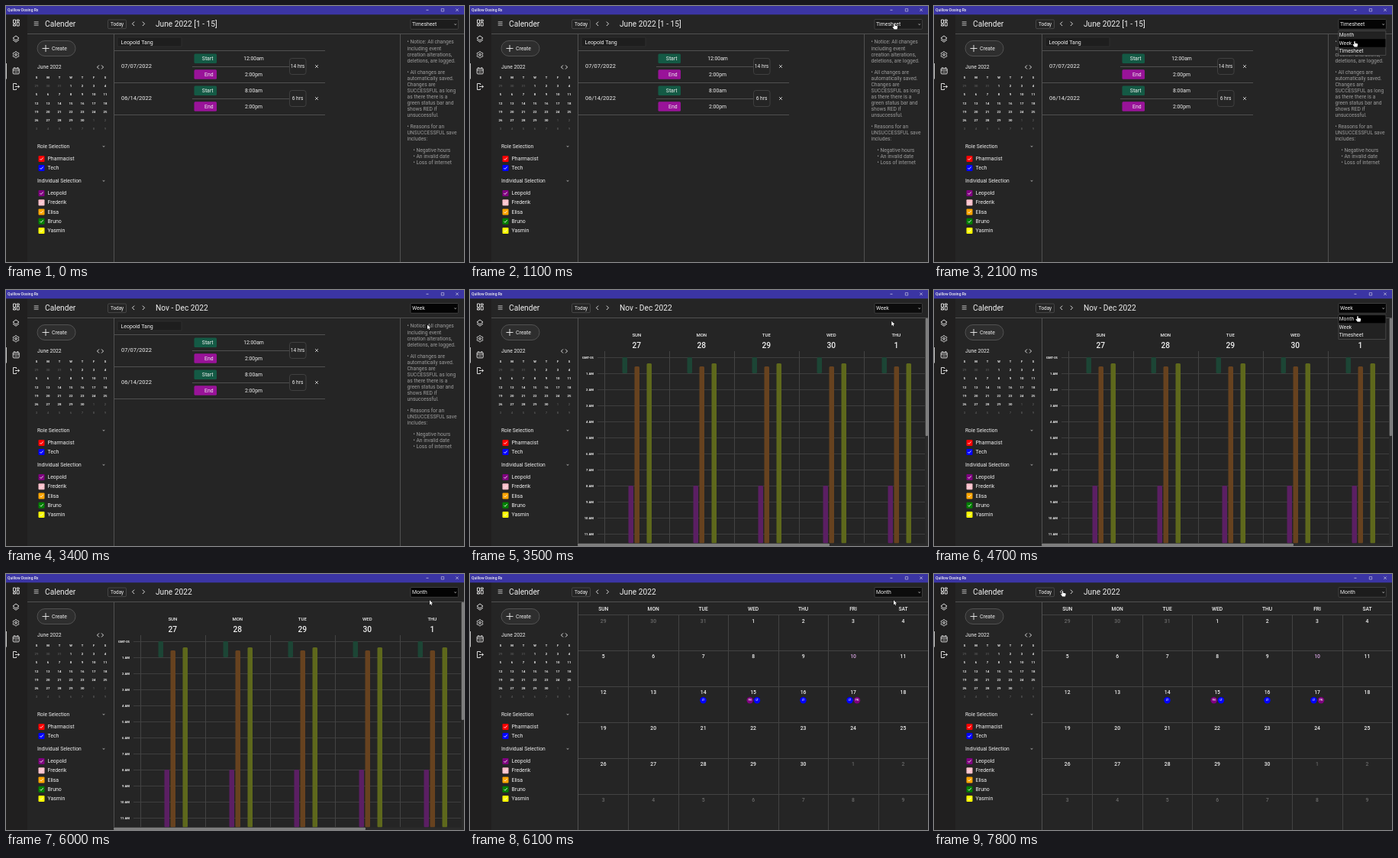
Write an HTML page with a canvas that moves like this. It is 600 by 335 pixels and loops after 8000 ms.

```html
<!DOCTYPE html>
<html lang="en">
<head>
<meta charset="utf-8">
<title>Calender</title>
<style>
  html, body { margin: 0; width: 100%; height: 100%; overflow: hidden; background: #252525; }
  canvas { display: block; width: 600px; height: 335px; }
</style>
</head>
<body>
<canvas id="stage"></canvas>
<script>
const canvas = document.getElementById('stage');
const ctx = canvas.getContext('2d');
const ratio = window.devicePixelRatio || 1;
canvas.width = 600 * ratio;
canvas.height = 335 * ratio;

const LOOP = 8000;
const WHITE = '#f0f0f0', RULE = '#505050', GRID = '#434343', DIM = '#5c5c5c', BACK = '#252525';
const DAYS = ['SUN', 'MON', 'TUE', 'WED', 'THU', 'FRI', 'SAT'];
const VIEWS = ['Month', 'Week', 'Timesheet'];

// Cursor keyframes: time, x, y of the pointing tip
const PATH = [
  [400, 562, 90], [1100, 556, 23], [1700, 556, 23], [2100, 551, 46],
  [3300, 551, 46], [3400, 552, 45.5], [3700, 553, 27.5], [4000, 554, 24],
  [4200, 554, 24], [4700, 555, 34], [6800, 555, 34.5], [7700, 168.5, 22]
];

function text(s, x, y, size = 6.8, color = WHITE, weight = 400, align = 'left') {
  ctx.font = `${weight} ${size}px Roboto, sans-serif`;
  ctx.fillStyle = color;
  ctx.textAlign = align;
  ctx.fillText(s, x, y);
}

function line(points, color = RULE, width = 1) {
  ctx.beginPath();
  for (let i = 0; i < points.length; i += 2) ctx.lineTo(points[i], points[i + 1]);
  ctx.strokeStyle = color;
  ctx.lineWidth = width;
  ctx.stroke();
}

function box(x, y, w, h, fill, stroke, radius = 0, width = 0.8) {
  ctx.beginPath();
  ctx.roundRect(x, y, w, h, radius);
  if (fill) { ctx.fillStyle = fill; ctx.fill(); }
  if (stroke) { ctx.strokeStyle = stroke; ctx.lineWidth = width; ctx.stroke(); }
}

function disc(x, y, r, fill, stroke) {
  ctx.beginPath();
  ctx.arc(x, y, r, 0, 2 * Math.PI);
  if (fill) { ctx.fillStyle = fill; ctx.fill(); }
  if (stroke) { ctx.strokeStyle = stroke; ctx.lineWidth = 0.9; ctx.stroke(); }
}

const chevron = (x, y, dir, size, width = 0.9) =>
  line([x - dir * size / 2, y - size, x + dir * size / 2, y, x - dir * size / 2, y + size], WHITE, width);

const caret = (x, y) => line([x - 1.3, y - 0.4, x, y + 0.5, x + 1.3, y - 0.4], WHITE, 0.7);

// Day shown in a six-week grid for June 2022, which starts on May 29
function gridDay(i) {
  if (i < 3) return [29 + i, false];
  return i < 33 ? [i - 2, true] : [i - 32, false];
}

function windowBar() {
  box(0, 0, 600, 11.3, '#3b35a4');
  text('Quillow Dosing Rx', 2, 5.2, 5, WHITE, 500);
  line([550.5, 5.3, 553.5, 5.3], WHITE, 0.6);
  box(570.3, 3.6, 3.4, 3.4, null, WHITE, 0, 0.5);
  line([589.3, 3.5, 592.7, 6.9], WHITE, 0.6);
  line([592.7, 3.5, 589.3, 6.9], WHITE, 0.6);
}

function gear(x, y) {
  ctx.beginPath();
  for (let i = 0; i <= 48; i++) {
    const a = i * Math.PI / 24, r = 3.7 + 0.6 * Math.cos(6 * a);
    ctx.lineTo(x + r * Math.sin(a), y + r * Math.cos(a));
  }
  ctx.strokeStyle = WHITE;
  ctx.lineWidth = 0.9;
  ctx.stroke();
  disc(x, y, 1.3, null, WHITE);
}

function rail() {
  box(0, 11, 28, 324, '#201f1f');
  box(0, 75, 0.9, 20.5, '#ddd');
  // dashboard
  box(9.5, 18, 3, 4.5, null, WHITE, 0, 0.9);
  box(9.5, 24, 3, 2, null, WHITE, 0, 0.9);
  box(14.2, 18, 3, 2, null, WHITE, 0, 0.9);
  box(14.2, 21.6, 3, 4.4, null, WHITE, 0, 0.9);
  // layers
  line([13, 39, 17, 42, 13, 45, 9, 42, 13, 39], WHITE, 0.9);
  line([9, 44.2, 13, 47.2, 17, 44.2], WHITE, 0.9);
  gear(13, 63.8);
  // calendar
  box(9.2, 81.5, 8, 7.3, null, WHITE, 1, 0.9);
  line([9.2, 83.8, 17.2, 83.8], WHITE, 0.9);
  line([11, 80.2, 11, 82], WHITE);
  line([15.4, 80.2, 15.4, 82], WHITE);
  line([11, 86.3, 15.5, 86.3], WHITE, 0.7);
  // log out
  line([13.5, 103, 13.5, 101.5, 9.5, 101.5, 9.5, 109.5, 13.5, 109.5, 13.5, 108], WHITE, 0.9);
  line([11.8, 105.5, 17.2, 105.5], WHITE, 0.9);
  chevron(16.6, 105.5, 1, 1.9);
}

function header(title) {
  for (let i = 0; i < 3; i++) line([36.7, 20.8 + i * 2.2, 42.6, 20.8 + i * 2.2], WHITE, 0.7);
  text('Calender', 51, 24, 10.2);
  box(133.5, 18, 24, 11.6, null, '#505050', 1.5);
  text('Today', 145.5, 24, 6.4, WHITE, 400, 'center');
  chevron(166.8, 23.3, -1, 2.7);
  chevron(180.2, 23.3, 1, 2.7);
  text(title, 196, 24, 10.2);
  line([28, 36.5, 600, 36.5]);
}

function check(label, color, y) {
  box(42.5, y - 4, 8, 8, color, null, 1);
  line([44.4, y, 45.9, y + 1.5, 48.7, y - 1.6], WHITE, 0.9);
  text(label, 54.5, y, 6.9);
}

function sidebar() {
  line([141.5, 36, 141.5, 335]);
  box(41, 45.5, 50, 20, '#2e2e2e', '#5c5c5c', 10);
  line([47.5, 55.5, 56.5, 55.5], WHITE, 0.9);
  line([52, 51, 52, 60], WHITE, 0.9);
  text('Create', 60, 55.7, 6.85);

  text('June 2022', 41, 80.5, 6.75);
  chevron(120.7, 80, -1, 2.5);
  chevron(126.3, 80, 1, 2.5);
  DAYS.forEach((d, i) => text(d[0], 40 + i * 15, 93.6, 4.1, WHITE, 700, 'center'));
  for (let i = 0; i < 42; i++) {
    const [day, inMonth] = gridDay(i);
    text(day, 40 + (i % 7) * 15, 105 + Math.floor(i / 7) * 11.15, 4.3, inMonth ? WHITE : DIM, inMonth ? 700 : 500, 'center');
  }

  text('Role Selection', 41, 183.8, 6.7);
  caret(128, 183.7);
  check('Pharmacist', '#f00', 200);
  check('Tech', '#00f', 212);
  text('Individual Selection', 41, 228.8, 6.7);
  caret(128, 228.8);
  const people = [['Leopold', 'purple'], ['Frederik', 'pink'], ['Elisa', 'orange'], ['Bruno', 'green'], ['Yasmin', 'yellow']];
  people.forEach(([name, color], i) => check(name, color, 245 + i * 12.25));
}

function shift(y, date, start, end, hours) {
  text(date, 151, y, 7.5);
  box(246.5, y - 16.5, 29.5, 12.5, '#145a45', null, 1.5);
  text('Start', 271.5, y - 10, 6.8, WHITE, 400, 'right');
  box(246.5, y + 4.3, 29.5, 12.5, '#991399', null, 1.5);
  text('End', 271.5, y + 10.8, 6.8, WHITE, 400, 'right');
  text(start, 324.5, y - 10, 6.8, WHITE, 400, 'center');
  text(end, 324.5, y + 10.8, 6.8, WHITE, 400, 'center');
  line([244, y + 0.5, 371, y + 0.5]);
  box(371.5, y - 10.5, 21.5, 21, BACK, '#484848', 3);
  text(hours, 382, y + 0.2, 6.65, WHITE, 400, 'center');
  line([405, y - 2, 409, y + 2], WHITE, 0.7);
  line([409, y - 2, 405, y + 2], WHITE, 0.7);
  line([142, y + 21.5, 418, y + 21.5]);
}

const NOTES = [
  [47.5, '• Notice: All changes', 'including event', 'creation alterations,', 'deletions, are logged.'],
  [86.8, '• All changes are', 'automatically saved.', 'Changes are', 'SUCCESSFUL as long', 'as there there is a', 'green status bar and', 'shows RED if', 'unsuccessful.'],
  [158, '• Reasons for an', 'UNSUCCESSFUL save', 'includes:']
];

function timesheetView() {
  box(146, 41, 84, 12, '#1e1e1e', '#303030', 1);
  text('Leopold Tang', 150.5, 47.5, 7);
  line([142, 58.5, 418, 58.5]);
  shift(79, '07/07/2022', '12:00am', '2:00pm', '14 hrs');
  shift(121, '06/14/2022', '8:00am', '2:00pm', '6 hrs');
  line([516.5, 36, 516.5, 335]);
  for (const [top, ...rows] of NOTES) rows.forEach((row, i) => text(row, 525.5, top + i * 8.05, 6.7, '#9c9c9c'));
  ['Negative hours', 'An invalid date', 'Loss of internet'].forEach((s, i) =>
    text('• ' + s, 533.5, 188.7 + i * 8.1, 6.7, '#9c9c9c'));
}

function weekView() {
  const bars = [[23.5, 88, 109, '#1c4535'], [31.5, 256, 331.5, '#5b1f63'], [39.5, 100, 331.5, '#67421f'], [55.5, 96, 331.5, '#5e681c']];
  for (let h = 0; h < 12; h++) {
    const y = 88 + h * 21;
    line([167, y + 0.5, 596, y + 0.5], '#3e3e3e');
    text(h ? h + ' AM' : 'GMT-05', 162, y + 0.3, 4.2, WHITE, 700, 'right');
  }
  ['27', '28', '29', '30', '1'].forEach((date, i) => {
    const x = 176 + i * 85;
    line([x + 0.5, 80, x + 0.5, 331], GRID);
    text(DAYS[i], x + 42.3, 59, 6, WHITE, 500, 'center');
    text(date, x + 42.3, 73, 10.2, WHITE, 500, 'center');
    for (const [dx, top, bottom, color] of bars) box(x + dx, top, 6.5, bottom - top, color, null, 1.5);
  });
  box(141, 331.5, 459, 3.5, '#2b2b2b');
  box(141, 331.8, 330, 3.2, '#7d7d7d', null, 1);
  box(596.5, 37, 3.5, 298, '#2b2b2b');
  box(596.7, 37, 3.3, 154, '#7d7d7d', null, 1);
}

function badge(x, initials, color) {
  disc(x, 165.2, 4.2, color);
  text(initials, x, 165.4, 3, WHITE, 700, 'center');
}

function monthView() {
  const step = 458.2 / 7;
  for (let c = 0; c < 7; c++) {
    const x = 142 + c * step;
    text(DAYS[c], x + step / 2, 45.9, 6.7, WHITE, 500, 'center');
    if (c) line([Math.round(x) + 0.5, 37, Math.round(x) + 0.5, 335].map((v, i) => i === 1 ? 53 : v), GRID);
  }
  for (let r = 0; r < 6; r++) line([142, 53.5 + r * 47, 600, 53.5 + r * 47], GRID);
  for (let i = 0; i < 42; i++) {
    const [day, inMonth] = gridDay(i);
    const color = !inMonth ? '#6a6a6a' : day === 10 ? '#d9a6e4' : WHITE;
    text(day, 142 + (i % 7 + 0.5) * step, 61.6 + Math.floor(i / 7) * 46.85, 6.8, color, 500, 'center');
  }
  for (const x of [305.5, 376, 436.5, 497.5]) badge(x, 'LT', '#00f');
  for (const x of [366.7, 507]) badge(x, 'FN', 'purple');
}

function selectBox(value, shade) {
  box(530, 17.5, 62.4, 12.8, `rgb(${shade},${shade},${shade})`, '#484848', 1);
  text(value, 532, 24, 6.85);
  caret(588.7, 24);
}

function menu(active) {
  box(530, 32.5, 61.8, 32, '#222', '#555', 0, 0.7);
  VIEWS.forEach((name, i) => {
    if (i === active) box(530.3, 32.8 + i * 10.5, 61.2, 10.5, '#000');
    text(name, 530.7, 38.2 + i * 10.5, 6.75);
  });
}

function cursorAt(t) {
  let i = 0;
  while (i < PATH.length - 2 && t > PATH[i + 1][0]) i++;
  const [t0, x0, y0] = PATH[i], [t1, x1, y1] = PATH[i + 1];
  const p = Math.min(1, Math.max(0, (t - t0) / (t1 - t0)));
  const e = p * p * (3 - 2 * p);
  return [x0 + (x1 - x0) * e, y0 + (y1 - y0) * e];
}

const ARROW = new Path2D('M0 0V5.8L1.4 4.6 2.3 6.6 3.2 6.2 2.3 4.2H4.1Z');
const HAND = new Path2D('M-.7 .4Q0-.5.7.4V2.7L3.6 3.3Q4.4 3.6 4.2 4.6L3.5 7.4H-.3L-2.5 4.6Q-2.4 3.6-1.6 4.1L-.7 4.8Z');

function cursor(x, y, shape) {
  ctx.save();
  ctx.translate(x, y);
  ctx.strokeStyle = '#000';
  ctx.lineWidth = 0.8;
  ctx.stroke(shape);
  ctx.fillStyle = '#fff';
  ctx.fill(shape);
  ctx.restore();
}

function draw(t) {
  ctx.setTransform(ratio, 0, 0, ratio, 0, 0);
  ctx.textBaseline = 'middle';
  box(0, 0, 600, 335, BACK);

  const open = (t >= 1500 && t < 3400) || (t >= 4300 && t < 6000);
  const selected = t < 3200 ? 2 : t < 5800 ? 1 : 0;
  const closedAt = t >= 6000 ? 6000 : t >= 3400 ? 3400 : -LOOP;
  const shade = open ? 4 : Math.round(4 + 24 * Math.min(1, (t - closedAt) / 300));
  const [x, y] = cursorAt(t);

  rail();
  windowBar();
  header(t < 3400 ? 'June 2022 [1 - 15]' : t < 6000 ? 'Nov - Dec 2022' : 'June 2022');
  sidebar();
  if (t < 3500) timesheetView();
  else if (t < 6100) weekView();
  else monthView();

  selectBox(VIEWS[selected], shade);
  if (open) menu(y > 32.8 ? Math.floor((y - 32.8) / 10.5) : selected);
  if (t >= 500) {
    const onSelect = x > 529 && x < 592 && (open || y < 31);
    const onArrows = x < 185;
    cursor(x, y, onSelect || onArrows ? HAND : ARROW);
  }
}

function tick() {
  const t = performance.now() % LOOP;
  draw(Math.floor(t / 100) * 100);
  requestAnimationFrame(tick);
}
tick();
</script>
</body>
</html>
```
